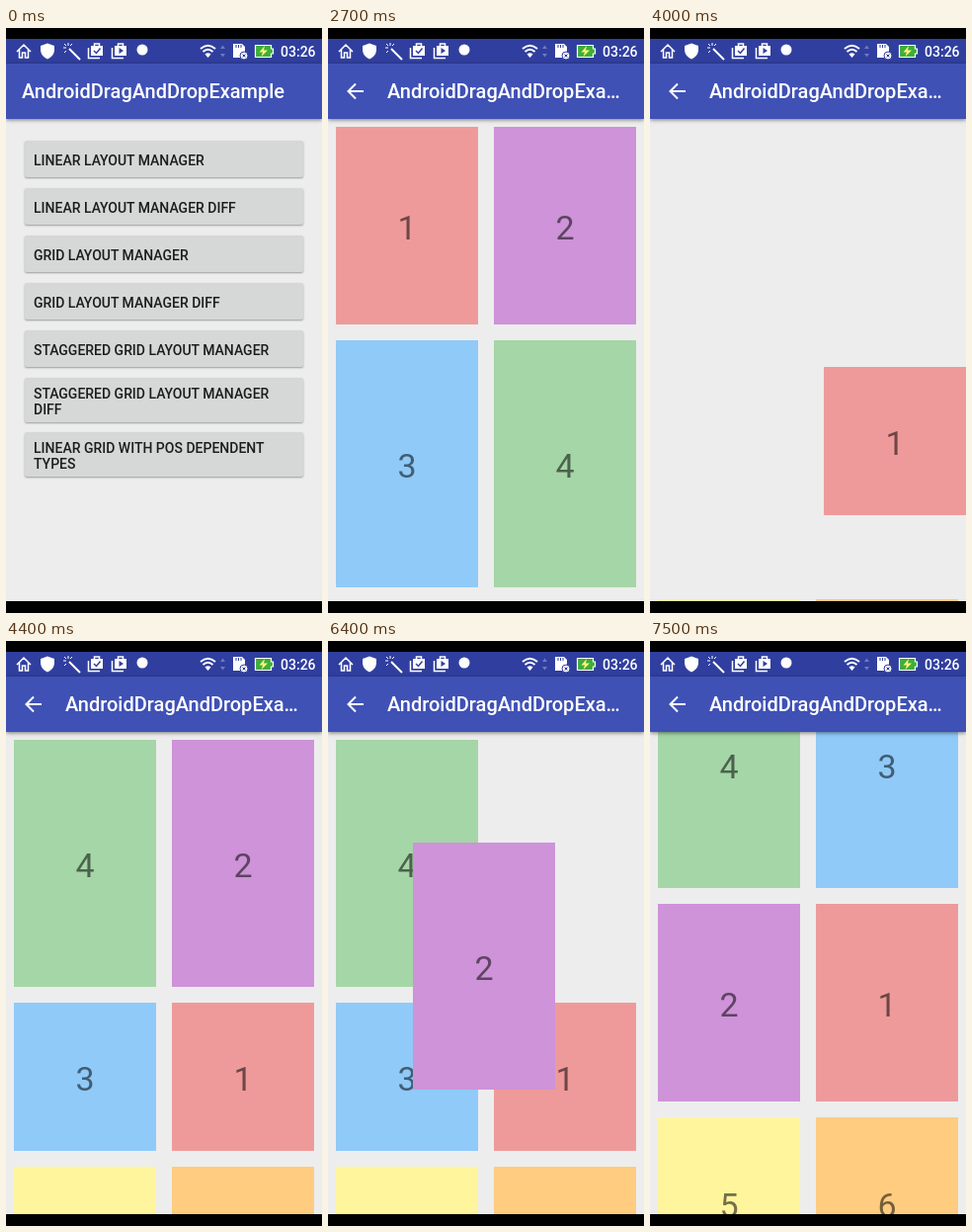
An HTML page that plays this animation: 320x592 px, repeating every 7600 ms.

```html
<!DOCTYPE html>
<html lang="en">
<head>
<meta charset="utf-8">
<title>Drag and drop demo</title>
<style>
  html, body { margin: 0; width: 100%; height: 100%; overflow: hidden; background: #000; }
  body { position: relative; font-family: Roboto, sans-serif; }
  div { position: absolute; box-sizing: border-box; }
  #phone { left: 0; top: 11px; width: 320px; height: 569px; overflow: hidden; }
  .screen { inset: 0; background: #ededed; overflow: hidden; }
  .status { left: 0; top: 0; width: 320px; height: 25px; background: #303f9f; }
  .bar { left: 0; top: 25px; width: 320px; height: 56px; background: #3f51b5; color: #fff;
    font: 500 20px/57px Roboto, sans-serif; white-space: nowrap; box-shadow: 0 1px 4px rgba(0,0,0,.5); }
  .bar span { position: absolute; left: 16px; }
  #grid .bar span { left: 60px; }
  .bar svg { position: absolute; left: 16px; top: 16px; }
  .button { left: 19px; width: 282px; background: #d6d7d7; border-radius: 2px; overflow: hidden;
    box-shadow: 0 1px 2px rgba(0,0,0,.35); }
  .button span { position: absolute; left: 9px; top: 50%; width: 262px; transform: translateY(-50%);
    margin-top: 1px; font: 500 14px/16px Roboto, sans-serif; color: rgba(0,0,0,.87); }
  #ripple { left: 141px; top: 18px; width: 0; height: 0; border-radius: 50%; background: rgba(0,0,0,.12);
    transform: translate(-50%, -50%); }
  .card { left: 0; top: 0; width: 144px; padding-top: 3px; display: flex; align-items: center;
    justify-content: center; font-size: 34px; color: rgba(0,0,0,.54); }
  #icons { position: absolute; left: 0; top: 0; }
</style>
</head>
<body>
<div id="phone">
  <div class="screen" id="menu">
    <div class="status"></div>
    <div class="bar"><span>AndroidDragAndDropExample</span></div>
  </div>
  <div class="screen" id="grid">
    <div id="cards"></div>
    <div class="status"></div>
    <div class="bar">
      <svg width="24" height="24"><path d="M20 12H5M12 4.500L4.500 12L12 19.500" fill="none" stroke="#fff" stroke-width="2"/></svg>
      <span>AndroidDragAndDropExa…</span>
    </div>
  </div>
</div>
<svg id="icons" width="320" height="40" fill="none" stroke="#fff" stroke-width="1.500">
  <path d="M11 24L18 17L25 24M13.500 22V30H16.500V25H19.500V30H22.500V22"/>
  <path d="M42 15.500L49 18V23Q48 29 42 31.500Q36 29 35 23V18Z" fill="#fff" stroke="none"/>
  <path d="M64 21L75 32" stroke-width="2"/>
  <path d="M58 20H61M63 15V18M59 16L61 18M67 16L65 18M59 25L61 23" stroke-width="1"/>
  <g id="bag">
    <path d="M83.500 20V30.500H95"/>
    <path d="M86 18H98V28H86Z" fill="#fff" stroke="none"/>
    <path d="M89.500 18V16H94.500V18"/>
  </g>
  <use href="#bag" x="24"/>
  <path d="M89 23L91.500 25.500L95.500 20.500" stroke="#303f9f"/>
  <path d="M114.500 20V26L119 23Z" fill="#303f9f" stroke="none"/>
  <circle cx="138" cy="22" r="5.500" fill="#fff" stroke="none"/>
  <path d="M197 21Q204.500 14.500 212 21M199.500 24Q204.500 19.500 209.500 24" stroke-width="2"/>
  <path d="M201.500 26.500Q204.500 24 207.500 26.500L204.500 30Z" fill="#fff" stroke="none"/>
  <path d="M217 21L219.500 17.500L222 21ZM217 26L219.500 29.500L222 26Z" fill="#6f7abf" stroke="none"/>
  <path d="M230 16H239L242 19V30H230Z" fill="#fff" stroke="none"/>
  <path d="M233 17V20M235.500 17V20M238 17V20" stroke="#303f9f" stroke-width="1"/>
  <circle cx="241" cy="28" r="4" fill="#fff" stroke="#303f9f" stroke-width="1"/>
  <path d="M239.500 26.500L242.500 29.500M242.500 26.500L239.500 29.500" stroke="#303f9f" stroke-width="1"/>
  <path d="M252.500 17.500H268.500V21H270.500V26H268.500V29.500H252.500Z" fill="#3fae3a" stroke-width="1.200"/>
  <path d="M262 18L256.500 24.500H260L258.500 29L265 22.500H261Z" fill="#fff27a" stroke="none"/>
  <text x="278" y="29" fill="#fff" stroke="none" font-family="Roboto, sans-serif" font-size="14" font-weight="500">03:26</text>
</svg>
<script>
const LOOP = 7600, STEP = 100;
const OPEN = 1255;                            // second screen starts to slide in
const FADE = 120, MOVE = 250;                 // list animation durations
const $ = id => document.getElementById(id);

const ramp = (t, start, length) => Math.min(1, Math.max(0, (t - start) / length));
const mix = (a, b, k) => a + (b - a) * k;
const smooth = k => (1 - Math.cos(Math.PI * k)) / 2;

function add(parent, className, html = '') {
  const el = document.createElement('div');
  el.className = className;
  el.innerHTML = html;
  parent.append(el);
  return el;
}

const labels = ['LINEAR LAYOUT MANAGER', 'LINEAR LAYOUT MANAGER DIFF', 'GRID LAYOUT MANAGER',
  'GRID LAYOUT MANAGER DIFF', 'STAGGERED GRID LAYOUT MANAGER', 'STAGGERED GRID LAYOUT MANAGER DIFF',
  'LINEAR GRID WITH POS DEPENDENT TYPES'];
const buttons = labels.map((label, i) => {
  const button = add($('menu'), 'button', `<span>${label}</span>`);
  button.style.top = (i < 6 ? 103 + 48 * i : 398) + 'px';
  button.style.height = (i < 5 ? 37 : 45) + 'px';
  return button;
});
const ripple = add(buttons[4], '');
ripple.id = 'ripple';

const colors = ['#ef9a9a', '#ce93d8', '#90caf9', '#a5d6a7', '#fff59d', '#ffcc80'];
const cards = colors.map((color, i) => {
  const card = add($('cards'), 'card', i + 1);
  card.style.background = color;
  return card;
});

const layouts = [
  { order: '123456', rows: [200, 250, 150] },
  { order: '423156', rows: [250, 150, 175] },
  { order: '432156', rows: [250, 200, 175] }
];
// Path points: time, x, y; the card is dropped at the last one.
const drags = [
  { id: 1, path: [[3000, 8, 100], [3100, 7, 110], [3300, 48, 184], [3500, 108, 250],
    [3700, 168, 314], [3800, 177, 322], [3834, 177, 341]] },
  { id: 2, path: [[5600, 168, 100], [5700, 165, 102], [5900, 143, 125], [6100, 115, 158],
    [6400, 86, 204], [6600, 50, 265], [6660, 40, 280]] }
];
for (const drag of drags) drag.drop = drag.path.at(-1)[0];

function place({ order, rows }, id) {
  const index = order.indexOf(id), row = index >> 1;
  const y = rows.slice(0, row).reduce((sum, h) => sum + h + 16, 100);
  return { x: 8 + 160 * (index % 2), y, h: rows[row], alpha: 1 };
}

function along(path, t) {
  const i = Math.max(1, path.findIndex(point => point[0] >= t));
  const [a, b] = [path[i - 1], path[i]], k = ramp(t, a[0], b[0] - a[0]);
  return { x: mix(a[1], b[1], k), y: mix(a[2], b[2], k) };
}

function cardState(id, t, scroll) {
  const done = drags.filter(drag => t >= drag.drop).length;
  const to = place(layouts[done], id);
  to.y -= scroll;
  const active = drags[done];
  if (active && active.id === id && t >= active.path[0][0])
    return { ...to, ...along(active.path, t), top: true };
  if (!done) return to;

  const last = drags[done - 1], since = t - last.drop;
  const k = smooth(ramp(since, FADE, MOVE));
  const from = place(layouts[done - 1], id);
  from.y -= scroll;
  if (last.id === id) {
    const [, x, y] = last.path.at(-1);
    return { ...to, x: mix(x, to.x, k), y: mix(y, to.y, k), top: k < 1 };
  }
  if (id > 4) return { ...to, y: mix(from.y, to.y, k) };
  return since < FADE
    ? { ...from, alpha: 1 - since / FADE }
    : { ...to, alpha: ramp(since, FADE + MOVE, FADE) };
}

function render(t) {
  const press = ramp(t, 850, 300);
  ripple.style.width = ripple.style.height = 300 * press + 'px';

  $('grid').style.opacity = 1 - (1 - ramp(t, OPEN, 200)) ** 4;
  $('grid').style.transform = `translateY(${Math.round(45 * (1 - ramp(t, OPEN, 350)) ** 5)}px)`;

  const scroll = 100 * ramp(t, 6450, 200);
  cards.forEach((card, i) => {
    const { x, y, h, alpha, top } = cardState(i + 1, t, scroll);
    card.style.transform = `translate(${Math.round(x)}px, ${Math.round(y - 11)}px)`;
    card.style.height = h + 'px';
    card.style.opacity = alpha;
    card.style.zIndex = top ? 1 : 0;
  });
}

const start = performance.now();
function tick() {
  const t = (performance.now() - start) % LOOP;
  render(Math.floor(t / STEP) * STEP);
  requestAnimationFrame(tick);
}
tick();
</script>
</body>
</html>
```
